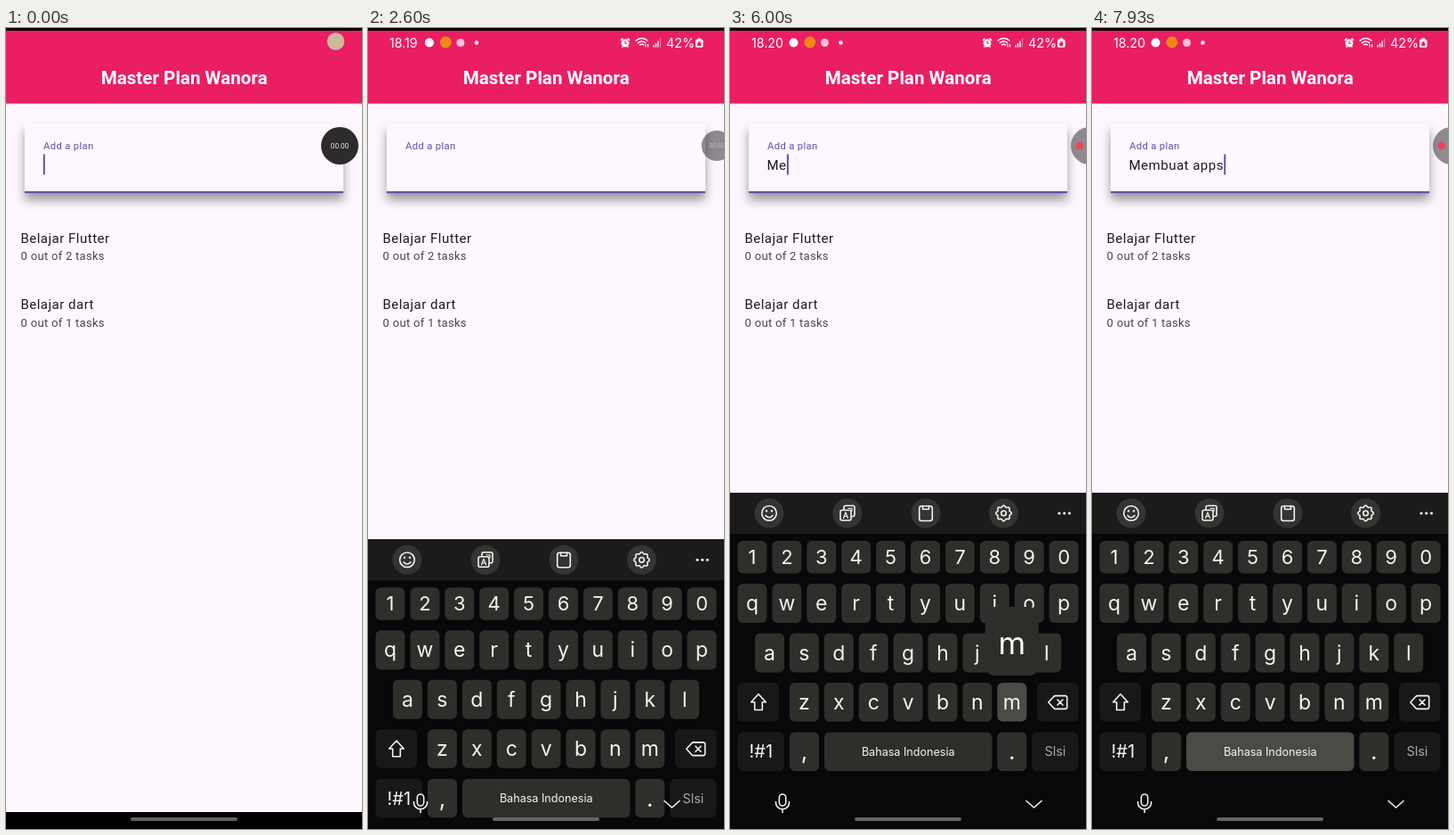
Recreate the animation shown at these times as an HTML page. Size 400 by 898 pixels, loop 8000 ms.

```html
<!DOCTYPE html>
<html lang="id">
<head>
<meta charset="utf-8">
<title>Master Plan</title>
<style>
html, body { margin: 0; width: 100%; height: 100%; overflow: hidden; background: #000; }
svg { display: block; width: 100%; height: 100%; }
text { font-family: Roboto, sans-serif; white-space: pre; }
.kb text, .ui { font-family: Inter, sans-serif; }
.mid { text-anchor: middle; }
.line { fill: none; stroke: #f4f3f1; stroke-width: 1.6; stroke-linecap: round; stroke-linejoin: round; }
.item { font-size: 15px; letter-spacing: .5px; fill: #1d1b20; }
.sub { font-size: 13.1px; letter-spacing: .25px; fill: #49454f; }
</style>
</head>
<body>
<svg viewBox="0 0 400 898">
  <defs>
    <filter id="shadow" x="-10%" y="-20%" width="120%" height="160%">
      <feDropShadow dx="0" dy="8" stdDeviation="6" flood-color="#000" flood-opacity=".39"/>
    </filter>
  </defs>

  <rect width="400" height="898"/>
  <rect y="3" width="400" height="876" fill="#fef7ff"/>
  <rect y="3" width="400" height="81.700" fill="#e91e63"/>
  <text x="106.700" y="63" font-size="20.600" font-weight="700" fill="#fff">Master Plan Wanora</text>

  <g id="status" class="ui" fill="#fff">
    <text class="ui" id="clock" x="24" y="21.500" font-size="14.200"></text>
    <g id="notes">
      <circle cx="69" cy="16.500" r="5"/>
      <circle cx="87.300" cy="16" r="6.500" fill="#f0861c"/>
      <circle cx="104" cy="16.500" r="4.500" fill="#fac0d4"/>
      <circle cx="122" cy="16.500" r="2.200"/>
    </g>
    <circle cx="289" cy="17" r="4.400"/>
    <path d="M284 14l2.400-2.400M294 14l-2.400-2.400M285.500 21.500l1-1M292.500 21.500l-1-1" stroke="#fff" stroke-width="1.600"/>
    <path d="M289 14.300V17.300H291.300" fill="none" stroke="#e91e63" stroke-width="1.100"/>
    <g fill="none" stroke="#fff" stroke-width="1.500">
      <path d="M300.500 14.500Q307.500 8.500 314.500 14.500M302.800 17Q307.500 13 312.200 17M305 19.300Q307.500 17.200 310 19.300"/>
      <path d="M312 21.500V18M314.600 18V21.500" stroke-width="1.100"/>
      <path d="M321 21.500V19M323.500 21.500V17M326 21.500V14.500" stroke-width="1.400"/>
      <path d="M328.500 21.500V11.500" stroke-width="1.200" opacity=".4"/>
    </g>
    <text class="ui" x="335" y="21.500" font-size="14.400">42%</text>
    <path d="M370.500 11.500h3.500v1.300h1a1.500 1.500 0 0 1 1.500 1.500v6a1.500 1.500 0 0 1-1.500 1.500h-5.500a1.500 1.500 0 0 1-1.500-1.500v-6a1.500 1.500 0 0 1 1.500-1.500h1z"/>
    <path d="M370.400 17h3.700v2.900h-3.700zM371.200 17v-1.500h2.100v1.500" fill="#e91e63" stroke="#e91e63" stroke-width=".5"/>
  </g>
  <circle id="spot" cx="370.500" cy="15" r="9.800" fill="#cdb898"/>

  <rect x="21" y="107" width="358" height="78" fill="#fef7ff" filter="url(#shadow)"/>
  <rect x="21" y="183" width="358" height="2.200" fill="#6750a4"/>
  <text x="42" y="136" font-size="11.250" letter-spacing=".35" fill="#6750a4">Add a plan</text>
  <text class="item" id="input" x="41.500" y="158.500"></text>
  <rect id="caret" y="141.500" width="2" height="23" fill="#6750a4"/>

  <text class="item" x="16.400" y="240.500">Belajar Flutter</text>
  <text class="sub" x="16.600" y="260">0 out of 2 tasks</text>
  <text class="item" x="16.400" y="315.200">Belajar dart</text>
  <text class="sub" x="16.600" y="335">0 out of 1 tasks</text>

  <g id="badge">
    <circle id="disc" r="21" fill="#2d2b2c"/>
    <text class="ui mid" id="timer" y="2.800" font-size="7.400" fill="#fff"></text>
  </g>
  <circle id="rec" cx="393" cy="132" r="4.200" fill="#ee4257"/>

  <g id="kb" class="kb"></g>
  <g id="nav"></g>
  <rect x="140" y="885" width="120" height="4" rx="2" fill="#676364"/>
</svg>
<script>
const $ = id => document.getElementById(id);
const clamp = v => Math.max(0, Math.min(1, v));
const ramp = (t, a, b) => clamp((t - a) / (b - a));
const mix = (a, b, k) => a + (b - a) * k;
const smooth = k => k * k * (3 - 2 * k);

// cubic-bezier(.2, 0, 0, 1)
function emphasized(x) {
  let lo = 0, hi = 1;
  for (let i = 0; i < 24; i++) {
    const s = (lo + hi) / 2;
    if (.6 * s * (1 - s) ** 2 + s ** 3 < x) lo = s; else hi = s;
  }
  return smooth(hi);
}

const KEY = '#302e2b', DARK = '#191817', DOWN = '#4b4b46';
const keys = {};
const parts = [];

function addKey(id, x, y, w, h, fill, label = '', size = 23, color = '#f6f5f3') {
  keys[id] = { cx: x + w / 2, y, fill };
  parts.push(`<rect id="k${id}" x="${x}" y="${y}" width="${w}" height="${h}" rx="6" fill="${fill}"/>`);
  if (label) parts.push(`<text id="t${id}" class="mid" x="${x + w / 2}" y="${y + h / 2 + size * .35}" font-size="${size}" fill="${color}">${label}</text>`);
}

function addRow(chars, x, y, h, size) {
  [...chars].forEach((c, i) => addKey(c, x + i * 38.9, y, 33, h, KEY, c, size));
}

function gear(cx, cy) {
  let d = '';
  for (let i = 0; i < 64; i++) {
    const a = i * Math.PI / 32, r = 7.9 + .9 * Math.cos(8 * a);
    d += `${i ? 'L' : 'M'}${(cx + r * Math.cos(a)).toFixed(2)} ${(cy + r * Math.sin(a)).toFixed(2)}`;
  }
  return d + 'Z';
}

function buildKeyboard() {
  parts.push('<rect y="521" width="400" height="400" fill="#080709"/><rect y="521" width="400" height="46" fill="#1c1b19"/>');
  for (const x of [44, 132, 220, 307.5]) parts.push(`<circle cx="${x}" cy="544" r="16.500" fill="#363432"/>`);
  parts.push(`<g class="line">
    <circle cx="44" cy="544" r="8.300"/><path d="M40 546.500Q44 551 48 546.500"/>
    <path d="M128 540v-2.500a2 2 0 0 1 2-2h8a2 2 0 0 1 2 2v8a2 2 0 0 1-2 2h-1"/>
    <rect x="124" y="540.500" width="12" height="11.500" rx="2"/>
    <path d="M127.500 549.500l2.500-6.500 2.500 6.500M128.500 547.500h3M133 538.500h4v3" stroke-width="1.200"/>
    <rect x="212.700" y="536" width="14.600" height="16.500" rx="2.500"/><path d="M216.500 536v3.500h7v-3.500"/>
    <path d="${gear(307.5, 544)}"/><circle cx="307.500" cy="544" r="2.800"/></g>
    <g fill="#f4f3f1"><circle cx="41" cy="541.500" r="1.200"/><circle cx="47" cy="541.500" r="1.200"/>
    <circle cx="370" cy="544" r="1.600"/><circle cx="375.700" cy="544" r="1.600"/><circle cx="381.400" cy="544" r="1.600"/></g>`);
  addRow('1234567890', 8.5, 575, 36.5, 22);
  addRow('qwertyuiop', 8.5, 623, 44, 23);
  addRow('asdfghjkl', 28, 678.5, 44, 23);
  addRow('zxcvbnm', 66.9, 734, 43.5, 23);
  addKey('Shift', 8.5, 734, 46.5, 43.5, DARK);
  addKey('Back', 345, 734, 46.5, 43.5, DARK);
  addKey('Sym', 8.5, 789.5, 52.5, 43.5, DARK, '!#1', 20);
  addKey('Comma', 67, 789.5, 33, 43.5, KEY, ',', 26);
  addKey('Space', 106, 789.5, 188.5, 43.5, KEY, 'Bahasa Indonesia', 12.6);
  addKey('Dot', 300.3, 789.5, 33, 43.5, KEY, '.', 26);
  addKey('Done', 339.3, 789.5, 52.2, 43.5, DARK, 'Slsi', 14.5, '#aaa8a6');
  parts.push(`<g class="line"><path id="arrow" d="M32 746.800L40.300 755.800H36.300V764.500H27.700V755.800H23.700Z"/>
    <path d="M357.800 756l6-6.500q.8-.9 2-.9h10.700a2.200 2.200 0 0 1 2.200 2.200v10.400a2.200 2.200 0 0 1-2.200 2.200h-10.700q-1.200 0-2-.9zM368 753l6 6M374 753l-6 6"/></g>
    <g id="pop"><rect width="60" height="77" rx="10" fill="#2f2d2a"/><text id="popText" class="mid" x="30" y="53" font-size="35" fill="#fff"></text></g>`);
  $('kb').innerHTML = parts.join('');

  const icons = '<rect x="55.300" y="859" width="7.400" height="13" rx="3.700"/><path d="M51.500 867.500v1.200a7.500 7 0 0 0 15 0v-1.200M59 875.800v3.700M333 866.500l8.500 7.500 8.500-7.500"/>';
  $('nav').innerHTML = `<g class="line" style="stroke:#000;stroke-width:2.700;stroke-opacity:.14">${icons}</g><g class="line">${icons}</g>`;
}

// [key, down, up, typed character]
const presses = [
  ['Shift', 3870, 3930, ''],
  ['m', 5670, 5730, 'M'], ['e', 5800, 5870, 'e'], ['m', 5970, 6070, 'm'],
  ['b', 6130, 6200, 'b'], ['u', 6330, 6400, 'u'], ['a', 6530, 6600, 'a'],
  ['t', 6670, 6730, 't'], ['Space', 6870, 6930, ' '], ['a', 7260, 7330, 'a'],
  ['p', 7400, 7470, 'p'], ['p', 7530, 7600, 'p'], ['s', 7730, 7800, 's'],
  ['Space', 7925, 8000, ' ']
];
const ticks = [1130, 2130, 3270, 4270, 5130];
const blinks = [270, 800, 1270, 1800, 2270, 2800, 3270, 3800, 4270, 4800, 5270, 5670];
const passed = (list, t) => list.filter(v => t >= v).length;

function drawKeys(t) {
  const upper = t >= 3930 && t < 5730;
  for (const id in keys) {
    $('k' + id).setAttribute('fill', keys[id].fill);
    if (/^[a-z]$/.test(id)) $('t' + id).textContent = upper ? id.toUpperCase() : id;
  }
  $('arrow').style.fill = upper ? '#f4f3f1' : 'none';
  const hit = presses.find(p => t >= p[1] && t < p[2]);
  if (hit) $('k' + hit[0]).setAttribute('fill', DOWN);
  const pop = hit && hit[0].length === 1;
  $('pop').style.display = pop ? '' : 'none';
  if (pop) {
    const k = keys[hit[0]], x = Math.min(332, k.cx - 30);
    $('pop').setAttribute('transform', `translate(${x} ${k.y - 85})`);
    $('popText').textContent = upper ? hit[0].toUpperCase() : hit[0];
  }
}

function drawBadge(t) {
  const dock = smooth(ramp(t, 2000, 2330)), tuck = smooth(ramp(t, 5670, 5930));
  const x = mix(mix(375, 391.8, dock), 404, tuck);
  const scale = mix(mix(1, .81, dock), 1, tuck);
  $('badge').setAttribute('transform', `translate(${x} 132) scale(${scale})`);
  $('disc').setAttribute('fill-opacity', mix(1, .53, dock));
  $('timer').setAttribute('fill-opacity', mix(1, .5, dock) * (1 - tuck));
  $('timer').textContent = '00.0' + passed(ticks, t);
  $('rec').setAttribute('opacity', tuck);
}

function draw(t) {
  const bar = ramp(t, 470, 800), late = t >= 5670;
  $('status').setAttribute('opacity', bar);
  $('spot').setAttribute('opacity', 1 - bar);
  $('clock').textContent = late ? '18.20' : '18.19';
  $('notes').setAttribute('transform', `translate(${late ? 2.5 : 0} 0)`);

  const text = presses.filter(p => t >= p[2]).map(p => p[3]).join('');
  $('input').textContent = text;
  $('caret').setAttribute('x', 41.8 + (text ? $('input').getComputedTextLength() : 0));
  $('caret').style.display = passed(blinks, t) % 2 ? 'none' : '';

  drawBadge(t);
  $('kb').style.display = t > 2470 ? '' : 'none';
  $('kb').setAttribute('transform', `translate(0 ${377 * (1 - emphasized(ramp(t, 2470, 2746)))})`);
  $('nav').setAttribute('opacity', ramp(t, 2330, 2470));
  drawKeys(t);
}

buildKeyboard();
function frame() {
  draw(performance.now() % 8000);
  requestAnimationFrame(frame);
}
frame();
</script>
</body>
</html>
```
